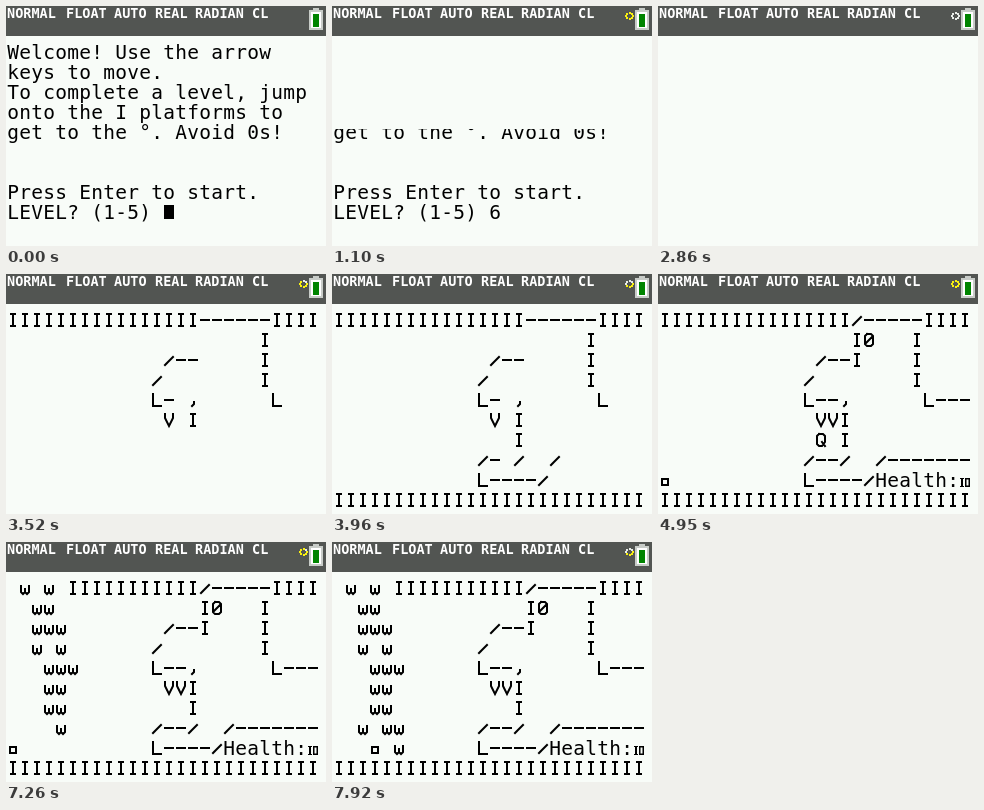
Recreate the animation shown at these times as an HTML page with a canvas. Size 320 by 240 pixels, loop 8000 ms.

```html
<!DOCTYPE html>
<html lang="en">
<head>
<meta charset="utf-8">
<title>Calculator game</title>
<style>
html, body { margin: 0; width: 100%; height: 100%; overflow: hidden; background: #f8fcf8; }
canvas { display: block; width: 100vw; height: 100vh; }
</style>
</head>
<body>
<canvas id="c" width="320" height="240"></canvas>
<script>
const g = document.getElementById('c').getContext('2d');
const LOOP = 8000, TICK = 110;
const PAPER = '#f8fcf8', INK = '#000', BAR = '#525552';
const MONO = '"DejaVu Sans Mono", "Liberation Mono", monospace';

// Stroke glyphs on a 10 x 14 cell
const GLYPHS = {
  'I': '3,1 7,1|5,1 5,13|3,13 7,13',
  '-': '1,7 9,7',
  '/': '1,12 9,4',
  'L': '1,1 1,13 9,13',
  'V': '1,1 1,5 5,13 9,5 9,1',
  'w': '1,5 1,11 3,13 5,11 7,13 9,11 9,5|5,8 5,11',
  ',': '6,9 6,11 4,13',
  '0': '3,1 7,1 9,3 9,11 7,13 3,13 1,11 1,3 3,1|2,10 8,4',
  'Q': '3,1 7,1 9,3 9,9 6,13 3,13 1,11 1,3 3,1|6,9 9,13',
  'o': '2,6 8,6 8,12 2,12 2,6'
};

const WELCOME = [
  'Welcome! Use the arrow', 'keys to move.', 'To complete a level, jump',
  'onto the I platforms to', 'get to the °. Avoid 0s!', '', '',
  'Press Enter to start.', 'LEVEL? (1-5) '
];

const MAP = [
  [1, 0, 'I'.repeat(16) + '------IIII'], [2, 21, 'I'],
  [3, 13, '/--'], [3, 21, 'I'], [4, 12, '/'], [4, 21, 'I'],
  [5, 12, 'L- ,'], [5, 22, 'L'], [6, 13, 'V I'], [7, 15, 'I'],
  [8, 12, '/- /  /'], [9, 12, 'L----/'], [10, 0, 'I'.repeat(26)]
];
const DETAILS = [
  [1, 16, '/'], [2, 16, 'I'], [3, 16, 'I'], [5, 14, '-'], [5, 23, '---'],
  [6, 14, 'V'], [8, 14, '-'], [8, 19, '-------']
];
// Columns hit in each row, top to bottom
const FLAMES = ['13', '23', '234', '24', '345', '34', '34', '425', '5']
  .flatMap((cols, i) => [...cols].map(c => [i + 1, +c]));

const cellX = col => 12 * col + 2;
const cellY = row => 19 + 20 * row;

function rect(color, x, y, w, h) {
  g.fillStyle = color;
  g.fillRect(x, y, w, h);
}

function write(row, col, text) {
  g.font = '19.5px ' + MONO;
  g.fillStyle = INK;
  g.textAlign = 'center';
  [...text].forEach((ch, i) => g.fillText(ch, cellX(col + i) + 5, cellY(row) + 14));
}

function put(row, col, text) {
  g.strokeStyle = INK;
  g.lineWidth = 2;
  g.lineCap = 'square';
  [...text].forEach((ch, i) => {
    const x = cellX(col + i), y = cellY(row);
    rect(PAPER, x, y, 10, 14);
    if (!GLYPHS[ch]) return;
    g.beginPath();
    for (const line of GLYPHS[ch].split('|')) {
      line.split(' ').forEach((pair, k) => {
        const [px, py] = pair.split(',').map(Number);
        k ? g.lineTo(x + px, y + py) : g.moveTo(x + px, y + py);
      });
    }
    g.stroke();
  });
}

function cursor(col) {
  rect(INK, cellX(col), cellY(9), 10, 14);
}

function spinner(t) {
  const k = Math.floor((t - 990) / 220), lit = 8 - k % 9;
  for (let i = 0; i < 8; i++) {
    const a = i * Math.PI / 4;
    rect(i < lit ? '#f8f010' : '#e8ece8',
      Math.round(296.5 + 3.5 * Math.cos(a)), Math.round(9 + 3 * Math.sin(a)), 2, 2);
  }
}

function header(t) {
  rect(BAR, 0, 0, 320, 30);
  g.font = 'bold 13.5px ' + MONO;
  g.fillStyle = '#fff';
  g.textAlign = 'left';
  const words = { NORMAL: 1, FLOAT: 60, AUTO: 108, REAL: 149, RADIAN: 189, CL: 246 };
  for (const w in words) g.fillText(w, words[w], 12);
  rect('#c8ccc8', 307, 2, 6, 3);
  rect('#c8ccc8', 303, 4, 14, 20);
  rect('#fff', 305, 6, 10, 16);
  rect('#008400', 307, 8, 6, 13);
  if (t >= 990) spinner(t);
}

function welcome(t) {
  WELCOME.forEach((line, i) => write(i + 1, 0, line));
  if (t < 330) cursor(13);
  if (t >= 550) write(9, 13, '6');
  if (t >= 550 && t < 990) cursor(14);
  if (t >= 1100) rect(PAPER, 0, 30, 320, 93);
}

function health() {
  write(9, 18, 'Health:');
  rect(INK, 303, 204, 2, 9);
  rect(INK, 302, 204, 4, 1);
  rect(INK, 302, 212, 4, 1);
  g.strokeStyle = INK;
  g.lineWidth = 1.5;
  g.strokeRect(307.75, 204.75, 3.5, 7.5);
}

function game(t) {
  for (const [row, col, s] of MAP) {
    if (t >= 3080 + 85 * (row - 1)) put(row, col, s);
  }
  if (t >= 4070) DETAILS.forEach(d => put(...d));
  if (t >= 4400) put(2, 17, '0');
  if (t >= 4620 && t < 6490) put(7, 14 - Math.floor((t - 4620) / 330), 'Q');
  if (t >= 6380) put(1, 0, '     ');
  FLAMES.forEach(([row, col], i) => {
    if (t >= 6380 + 55 * i) put(row, col, 'w');
  });
  if (t >= 4180) {
    health();
    put(9, [7370, 7590, 7920].filter(m => t >= m).length, 'o');
  }
}

function draw(now) {
  const t = Math.floor(now % LOOP / TICK) * TICK;
  rect(PAPER, 0, 0, 320, 240);
  if (t < 1210) welcome(t);
  else if (t >= 1870 && t < 2750) write(1, 0, 'Please wait');
  else game(t);
  header(t);
}

const start = performance.now();
function frame() {
  draw(performance.now() - start);
  requestAnimationFrame(frame);
}
frame();
</script>
</body>
</html>
```
